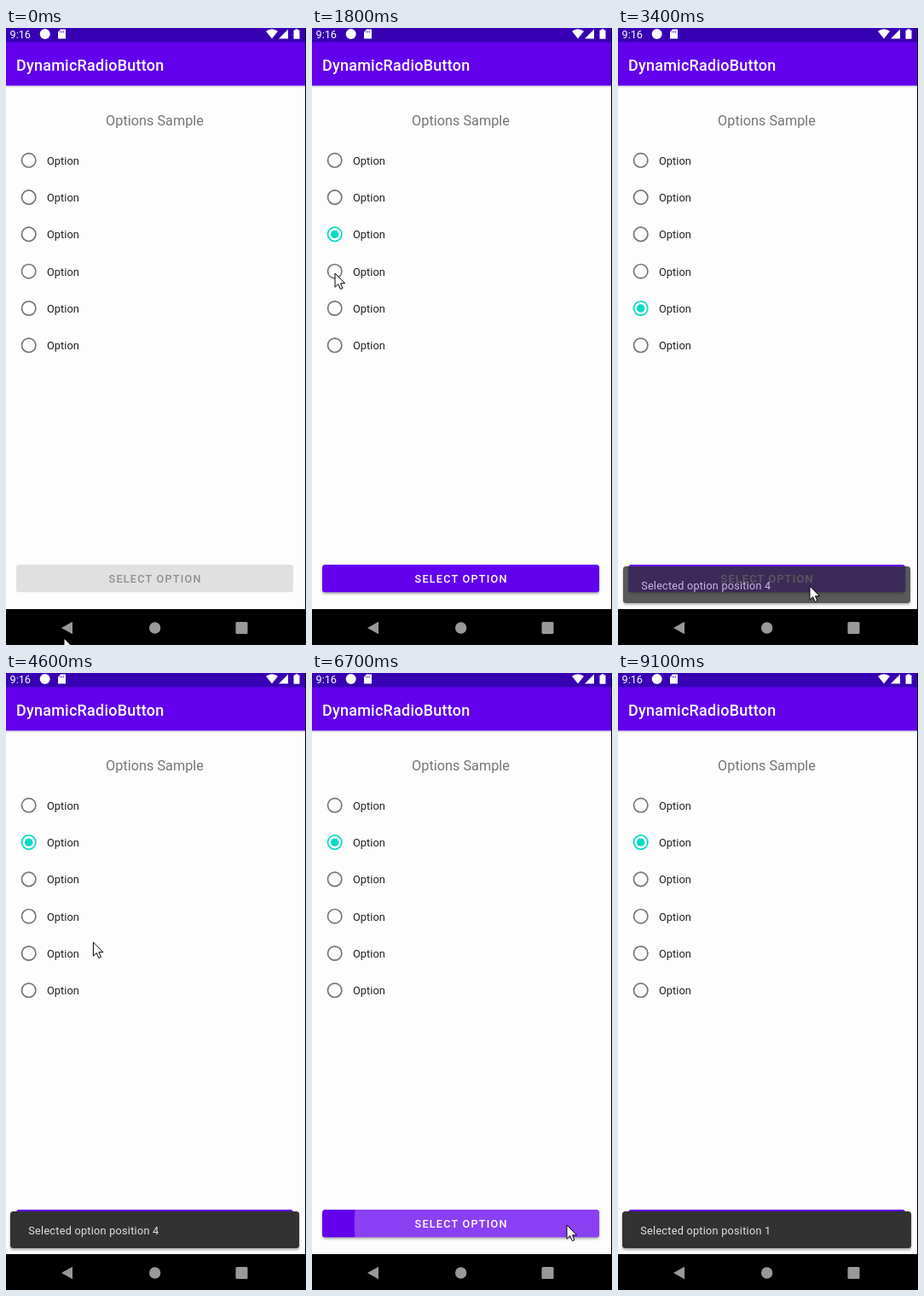
Recreate the animation shown at these times as an HTML page. Size 352x722 px, loop 9200 ms.

```html
<!DOCTYPE html>
<html lang="en">
<head>
<meta charset="utf-8">
<title>Radio options</title>
<style>
  html, body { margin: 0; width: 100%; height: 100%; overflow: hidden; background: #fdfdfd; }
  svg { display: block; width: 100vw; height: 100vh; font-family: Roboto, sans-serif; }
  .medium { font-weight: 500; }
</style>
</head>
<body>
<svg viewBox="0 0 352 722" xmlns="http://www.w3.org/2000/svg">
  <defs>
    <clipPath id="buttonShape"><rect x="12" y="628" width="325" height="32.5" rx="3.5"/></clipPath>
    <linearGradient id="barShade" x2="0" y2="1">
      <stop stop-color="#000" stop-opacity=".14"/>
      <stop offset="1" stop-color="#000" stop-opacity="0"/>
    </linearGradient>
    <filter id="soft" x="-5%" y="-30%" width="110%" height="160%"><feGaussianBlur stdDeviation="1.6"/></filter>
  </defs>

  <rect width="352" height="722" fill="#fdfdfd"/>
  <rect y="67.5" width="352" height="3" fill="url(#barShade)"/>
  <rect y="16" width="352" height="51.5" fill="#6200ee"/>
  <rect width="352" height="16.5" fill="#3700b3"/>

  <g fill="#fff">
    <text x="4.5" y="11.5" font-size="12.7">9:16</text>
    <circle cx="45.7" cy="7" r="6"/>
    <path d="M64 1.5h6V12.5h-9V4.7z"/>
    <path d="M305 3.8Q312 -1.5 319 3.8L312 12.5z"/>
    <path d="M331 1.5V12.5H320z"/>
    <path d="M337.5 2.5h2V1.3h3v1.2h2v10.3h-7z"/>
    <text class="medium" x="12" y="50" font-size="18" letter-spacing=".23">DynamicRadioButton</text>
  </g>
  <path d="M63.5 3.5v2M65.5 3.5v2M67.5 3.5v2" stroke="#3700b3" stroke-width=".8"/>

  <text x="174.5" y="114" font-size="16.3" text-anchor="middle" fill="#757575">Options Sample</text>
  <g id="rows"></g>

  <rect id="buttonShade" x="12" y="629.5" width="325" height="32.5" rx="3.5" opacity=".35" filter="url(#soft)"/>
  <g clip-path="url(#buttonShape)">
    <rect id="button" x="12" y="628" width="325" height="32.5"/>
    <circle id="wave" cy="644.5" fill="#fff"/>
  </g>
  <text id="label" class="medium" x="120.5" y="649" font-size="12.7" letter-spacing="1.22">SELECT OPTION</text>

  <g id="snack">
    <rect x="5" y="632" width="339" height="43" rx="3.5" opacity=".35" filter="url(#soft)"/>
    <rect x="5" y="630" width="339" height="43" rx="3.5" fill="#323232"/>
    <text id="message" x="26.3" y="657" font-size="12.7" letter-spacing=".25" fill="#e2e2e2"></text>
  </g>

  <rect y="680" width="352" height="42"/>
  <g fill="#999">
    <path d="M65 702L78 694.8V709.2z"/>
    <circle cx="174.7" cy="702" r="6.7"/>
    <rect x="269.5" y="695" width="14" height="14" rx="1.5"/>
  </g>
  <rect x="351" width="1" height="722"/>
  <path id="cursor" d="M0 0V16.2L3.8 12.7L6.4 18.6L9 17.4L6.5 11.8H11.6z" fill="#fff" stroke="#000" stroke-width="1"/>
</svg>

<script>
const LOOP = 9200, STEP = 100;
const ROW_TOP = 154.8, ROW_GAP = 43.3, RADIO_X = 26.7;
const TEAL = '#03dac5', GREY = '#757575', PURPLE = '#6200ee';

// time, x, y of the pointer tip
const path = [
  [0, 68, 714], [1000, 25, 243], [1400, 25, 243], [1800, 27, 287], [2100, 27, 287],
  [2500, 30, 326], [2700, 30, 326], [3100, 225, 653], [3500, 225, 653],
  [4100, 27, 197], [4400, 27, 197], [5000, 318, 652], [5800, 311, 673],
  [6400, 299, 646], [7100, 299, 646], [7800, 300, 724], [9200, 300, 724]
];
const picks = [
  { row: 2, down: 1200, up: 1400 }, { row: 3, down: 1900, up: 2000 },
  { row: 4, down: 2500, up: 2700 }, { row: 1, down: 4200, up: 4400 }
];
const presses = [{ x: 229, down: 3100, up: 3250 }, { x: 299, down: 6600, up: 6900 }];
const snacks = [{ from: 3280, to: 6120, pos: 4 }, { from: 6980, to: Infinity, pos: 1 }];

const $ = id => document.getElementById(id);
const clamp = v => Math.max(0, Math.min(1, v));
const mix = (a, b, p) => a + (b - a) * p;
const easeOut = (p, power) => 1 - Math.pow(1 - clamp(p), power);
const set = (el, attrs) => { for (const k in attrs) el.setAttribute(k, attrs[k]); };

function add(parent, tag, attrs) {
  const el = document.createElementNS('http://www.w3.org/2000/svg', tag);
  set(el, attrs);
  return parent.appendChild(el);
}

const rows = Array.from({ length: 6 }, (_, i) => {
  const cx = RADIO_X, cy = ROW_TOP + i * ROW_GAP;
  const part = attrs => add($('rows'), 'circle', { cx, cy, ...attrs });
  const row = {
    ripple: part({ opacity: 0 }),
    ring: part({ r: 8.2, fill: 'none', 'stroke-width': 1.7 }),
    dot: part({ fill: TEAL })
  };
  add($('rows'), 'text', { x: 48, y: cy + 4.8, 'font-size': 12.9, fill: '#212121' }).textContent = 'Option';
  return row;
});

const rippleAlpha = (t, p) => t < p.down ? 0 : 1 - clamp((t - p.up) / 200);

function pointerAt(t) {
  const i = path.findIndex((k, n) => n && t <= k[0]);
  const [t0, x0, y0] = path[i - 1], [t1, x1, y1] = path[i];
  const u = (t - t0) / (t1 - t0), p = u * u * (3 - 2 * u);
  return [mix(x0, x1, p), mix(y0, y1, p)];
}

function drawRows(t) {
  const pick = picks.filter(p => t >= p.up).pop();
  rows.forEach((row, i) => {
    const on = pick && pick.row === i;
    const press = picks.find(p => p.row === i);
    set(row.ring, { stroke: on ? TEAL : GREY });
    set(row.dot, { r: on ? 4.7 * clamp((t - pick.up + 100) / 200) : 0 });
    if (press) set(row.ripple, {
      r: mix(6, 18, clamp((t - press.down) / 225)),
      opacity: .08 * rippleAlpha(t, press)
    });
  });
  return !!pick;
}

function drawButton(t, enabled) {
  set($('button'), { fill: enabled ? PURPLE : '#e0e0e0' });
  set($('label'), { fill: enabled ? '#fff' : '#8f8f8f' });
  set($('buttonShade'), { visibility: enabled ? 'visible' : 'hidden' });
  const press = presses.filter(p => t >= p.down).pop();
  if (!press) return set($('wave'), { r: 0 });
  const p = easeOut((t - press.down) / 225, 2.7);
  set($('wave'), {
    cx: mix(press.x, 174.5, p),
    r: mix(97, 164, p),
    opacity: .25 * rippleAlpha(t, press)
  });
}

function drawSnack(t) {
  const snack = snacks.find(s => t >= s.from && t < s.to + 75);
  set($('snack'), { visibility: snack ? 'visible' : 'hidden' });
  if (!snack) return;
  const p = clamp((t - snack.from) / 150);
  const s = mix(.8, 1, easeOut(p, 2.2));
  set($('snack'), {
    opacity: p * (1 - clamp((t - snack.to) / 75)),
    transform: `translate(174.5 651.5) scale(${s}) translate(-174.5 -651.5)`
  });
  $('message').textContent = 'Selected option position ' + snack.pos;
}

function draw(time) {
  const t = Math.floor(time % LOOP / STEP) * STEP;
  drawButton(t, drawRows(t));
  drawSnack(t);
  const [x, y] = pointerAt(t);
  set($('cursor'), { transform: `translate(${x} ${y})` });
}

const start = performance.now();
function tick() {
  draw(performance.now() - start);
  requestAnimationFrame(tick);
}
tick();
</script>
</body>
</html>
```
